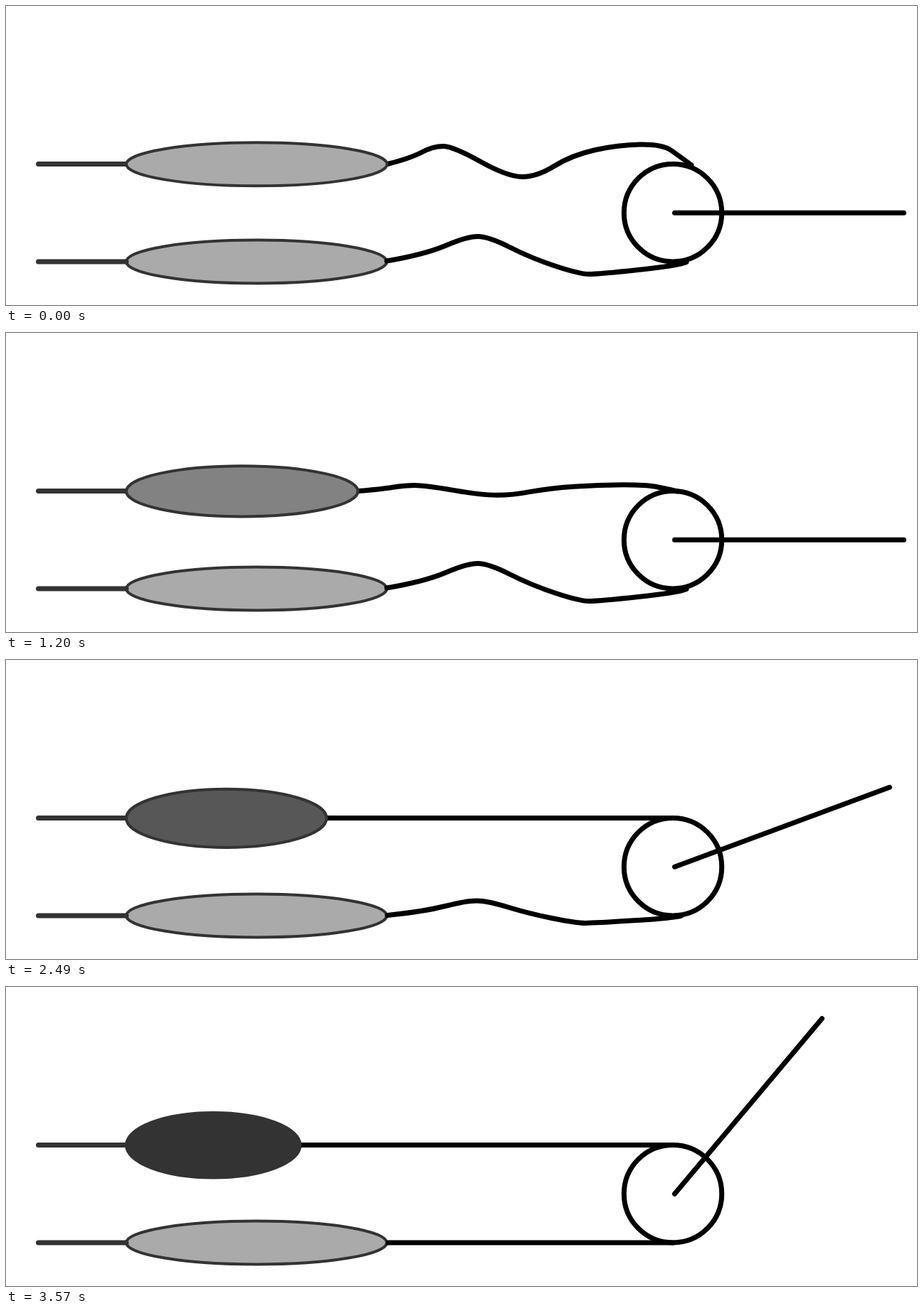
Write an HTML page with a canvas that moves like this. It is 1280 px wide and 421 px high and loops after 4500 ms.

```html
<!DOCTYPE html>
<html lang="en">
<head>
<meta charset="utf-8">
<title>Lever and cords</title>
<style>
  html, body { margin: 0; width: 100%; height: 100%; overflow: hidden; background: #fff; }
  canvas { display: block; width: 1280px; height: 421px; }
</style>
</head>
<body>
<canvas id="stage" width="1280" height="421"></canvas>
<script>
const ctx = document.getElementById('stage').getContext('2d');
const LOOP = 4500, STEP = 30, LAST = 119, TAUT = 59;
const TOP = 222.5, BOTTOM = 360, LEFT = 169;
const HUB = { x: 937, y: 291.2, r: 68.7 };
const DARK = '#333', BLACK = '#000';

// Each cord: corners of the slack shape, x range when taut, curve of the x travel
const upper = {
  corners: [[536, 222.5], [568, 214.5], [600, 197.5], [628, 197.5], [705, 240.5], [746, 240.5],
    [795, 210], [860, 195.5], [922, 194.5], [947, 212], [963, 224]],
  taut: [475, 934], y: TOP, power: 1.6
};
const lower = {
  corners: [[535, 359], [588, 350], [648, 324.5], [678, 324.5], [738, 355], [806, 377.5],
    [832, 377.5], [945, 365.5], [956, 360.5]],
  taut: [537, 937], y: BOTTOM, power: 1
};

const mix = (a, b, k) => a + (b - a) * k;
const clamp = k => Math.max(0, Math.min(1, k));

function stroke(color, width) {
  ctx.strokeStyle = color;
  ctx.lineWidth = width;
  ctx.stroke();
}

function line(x0, y0, x1, y1, color) {
  ctx.beginPath();
  ctx.moveTo(x0, y0);
  ctx.lineTo(x1, y1);
  stroke(color, 7);
}

// Rounds the corners through the midpoints of the edges
function cord({ corners, taut, y, power }, pull) {
  const x0 = corners[0][0], x1 = corners[corners.length - 1][0];
  const pts = corners.map(([x, cy]) => {
    const u = ((x - x0) / (x1 - x0)) ** power;
    return [x + mix(taut[0] - x0, taut[1] - x1, u) * pull, mix(cy, y, pull)];
  });
  const end = pts.length - 1;
  ctx.beginPath();
  ctx.moveTo(...pts[0]);
  for (let i = 1; i < end; i++) {
    const [ax, ay] = pts[i], [bx, by] = pts[i + 1];
    const k = i === end - 1 ? 1 : 0.5;
    ctx.quadraticCurveTo(ax, ay, mix(ax, bx, k), mix(ay, by, k));
  }
  stroke(BLACK, 7);
}

function muscle(right, y, ry, gray) {
  const rx = (right - LEFT) / 2;
  ctx.beginPath();
  ctx.ellipse(LEFT + rx, y, rx, ry, 0, 0, Math.PI * 2);
  ctx.fillStyle = `rgb(${gray},${gray},${gray})`;
  ctx.fill();
  stroke(DARK, 4);
}

function draw(step) {
  const k = step / LAST;
  const pull = clamp(step / TAUT);
  const turn = clamp(step / TAUT - 1);
  const right = mix(535.5, 413.5, k);

  ctx.fillStyle = '#fff';
  ctx.fillRect(0, 0, 1280, 421);

  line(45.5, TOP, LEFT, TOP, DARK);
  if (pull < 1) cord(upper, pull);
  else line(right, TOP, HUB.x, TOP, BLACK);
  muscle(right, TOP + 0.3, mix(30.5, 45.7, k), 170 - step);

  muscle(535, BOTTOM, 30.5, 170);
  line(45.5, BOTTOM, LEFT, BOTTOM, DARK);
  cord(lower, turn);

  ctx.beginPath();
  ctx.arc(HUB.x, HUB.y, HUB.r, 0, Math.PI * 2);
  stroke(BLACK, 7);

  const angle = turn * 50 * Math.PI / 180;
  const pivot = HUB.x + 2.5, arm = 322;
  line(pivot, HUB.y, pivot + arm * Math.cos(angle), HUB.y - arm * Math.sin(angle), BLACK);
}

ctx.lineCap = ctx.lineJoin = 'round';
const start = performance.now();

function tick() {
  const t = (performance.now() - start) % LOOP;
  draw(Math.min(LAST, Math.floor(t / STEP)));
  requestAnimationFrame(tick);
}
tick();
</script>
</body>
</html>
```
